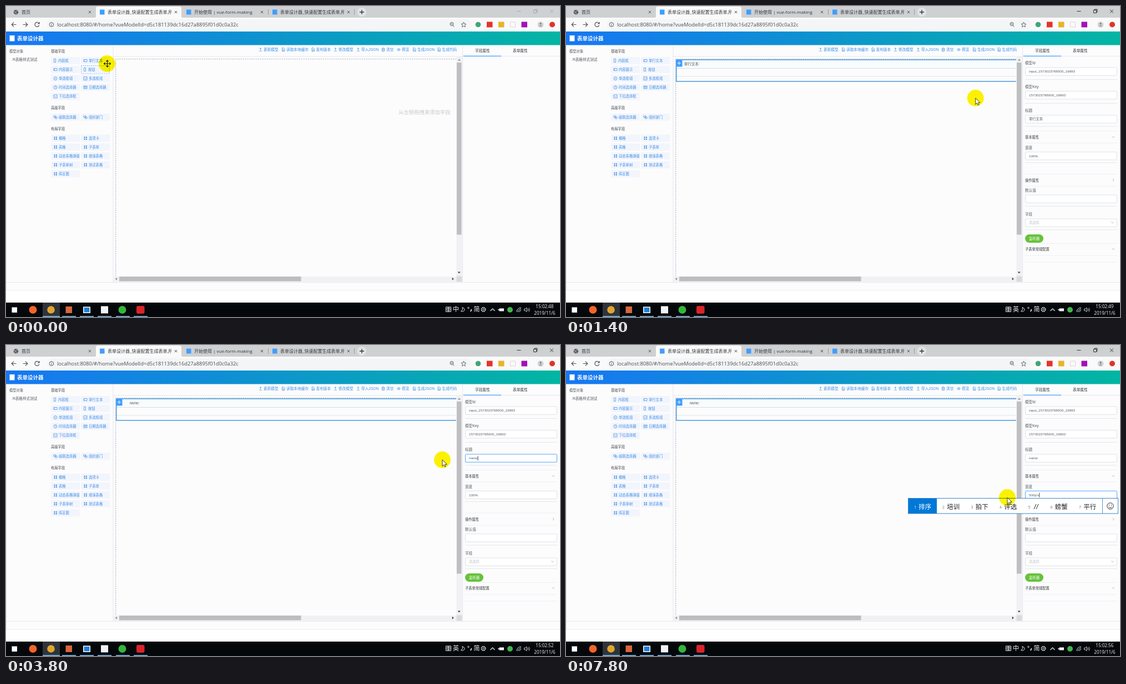
An HTML page for the animation above (8000 ms loop, 998 px wide and 561 px high).

```html
<!DOCTYPE html>
<html lang="zh">
<head>
<meta charset="utf-8">
<style>
html, body { margin: 0; width: 100%; height: 100%; overflow: hidden; background: #fcfcfd; }
svg { display: block; width: 998px; height: 561px; }
text { font-family: "Liberation Sans", "Noto Sans CJK SC", "Noto Sans CJK", sans-serif; white-space: pre; }
.ui { font-family: "Open Sans", "Noto Sans CJK SC", "Noto Sans CJK", sans-serif; }
#spot { mix-blend-mode: multiply; }
</style>
</head>
<body>
<svg id="stage" viewBox="0 0 998 561"></svg>
<script>
const BLUE = '#3a8ee6', INK = '#55585e', LINE = '#e4e7ed';
const out = [];
const add = s => out.push(s);
const rect = (x, y, w, h, fill, more = '') =>
  add(`<rect x="${x}" y="${y}" width="${w}" height="${h}" fill="${fill}" ${more}/>`);
const circle = (x, y, r, fill, more = '') =>
  add(`<circle cx="${x}" cy="${y}" r="${r}" fill="${fill}" ${more}/>`);
const path = (d, stroke, w = 1, more = '') =>
  add(`<path d="${d}" fill="none" stroke="${stroke}" stroke-width="${w}" ${more}/>`);
const text = (x, y, s, size, fill, more = '') =>
  add(`<text x="${x}" y="${y}" font-size="${size}" fill="${fill}" ${more}>${s}</text>`);
const hline = (x1, x2, y, color = LINE, w = 1) => path(`M${x1} ${y}H${x2}`, color, w);
const group = (id, draw, more = '') => { add(`<g id="${id}" ${more}>`); draw(); add('</g>'); };
const UI = 'class="ui"';

// Small outline icons, about 6 px wide, centred on x, y
const shapes = {
  tall: 'M-1.5-3h3v6h-3z',
  wide: 'M-3-2h6v4h-6zM-1.5-.8v1.6',
  radio: 'M-3 0a3 3 0 1 0 6 0a3 3 0 1 0-6 0M-.8 0h1.6M0-.8v1.6',
  check: 'M-3-3h6v6h-6zM-1.5 0l1.2 1.3L2-1.5',
  clock: 'M-3 0a3 3 0 1 0 6 0a3 3 0 1 0-6 0M0-2v2l1.3.8',
  date: 'M-3-2.5h6v5h-6zM-3-1h6M-1.5 .8h3',
  select: 'M-3-3h6v6h-6zM-1.5-.7L0 .8L1.5-.7',
  link: 'M-3-2.5h3.5v3h-3.5zM-.5-.5h3.5v3h-3.5z',
  grid: 'M-2.5-1.6h2M.9-1.6h2M-2.5 1.7h2M.9 1.7h2',
  up: 'M-2.5 2.5h5M0 1v-4M-1.8-1.3L0-3l1.8 1.7',
  doc: 'M-2-3h3l1.5 1.5V3h-4.5zM-1 0h2.2M-1 1.5h2.2',
  trash: 'M-3-2h6M-1-3h2M-2-2v5h4v-5M-.6-.5v2M.6-.5v2',
  eye: 'M-3.2 0Q0-4 3.2 0Q0 4-3.2 0zM-.8 0a.8.8 0 1 0 1.6 0a.8.8 0 1 0-1.6 0'
};
const icon = (name, x, y, color = BLUE) =>
  path(shapes[name], color, name === 'grid' ? 2.3 : .75, `transform="translate(${x} ${y})"`);
const cross = (x, y, r, c) => path(`M${x - r} ${y - r}l${2 * r} ${2 * r}M${x + r} ${y - r}l${-2 * r} ${2 * r}`, c, .9);
const chevron = (x, y, right) =>
  path(right ? `M${x - 1} ${y - 2.2}l2.2 2.2l-2.2 2.2` : `M${x - 2.2} ${y - 1}l2.2 2.2l2.2-2.2`, '#909399', .7);

function browser() {
  rect(0, 0, 998, 22, '#cfd0d2');
  rect(0, 21, 998, 25, '#fafafa');
  path('M159 22Q162 22 162 18V4Q162 1 166 1H312Q316 1 316 4V18Q316 22 319 22Z', 'none', 0, 'style="fill:#fafafa"');
  [[183, 173], [339, 329], [494, 484]].forEach(([x, ix], i) => {
    rect(ix - 4, 6.5, 8.5, 9, '#409eff');
    text(x, 14, i === 1 ? '开始使用 | vue-form-making' : '表单设计器_快速配置生成表单,所', 8, '#33363a',
      `${UI} clip-path="url(#tab${i})"`);
  });
  circle(18, 11, 4.3, '#55585c');
  path('M14.5 10l3 1l1 3M18 7.5l2 2l1.5-.5', '#d5d6d8', 1);
  text(28, 14, '首页', 8, '#33363a', UI);
  [151, 306, 461, 617].forEach(x => cross(x, 11, 2.2, '#44474a'));
  path('M472.5 6v10M627.5 6v10', '#8c8f93', .8);
  circle(641, 11, 8, '#e2e3e5');
  path('M637 11h8M641 7v8', '#333', 1.3);
  group('controls', () => {
    path('M920.5 9.5h7M950.5 7.5h5v5h-5zM952 7.5v-1.5h5v5h-1.5', 'currentColor', .9);
    cross(983, 9.5, 3, 'currentColor');
  });
  rect(74, 24, 765, 19, '#f4f5f6', 'rx="9.5"');
  path('M18.5 33.5h-8M14 29.7l-3.8 3.8l3.8 3.8M30.500 33.500h8M35 29.700l3.800 3.800l-3.800 3.800', '#4c4f53', 1.2);
  path('M59.500 31.500a4 4 0 1 0 .3 3.200M60 29v3h-3', '#4c4f53', 1.2);
  circle(82, 33.500, 3.800, 'none', 'stroke="#55585c"');
  path('M82 33v2.600M82 31.200v.9', '#55585c', 1);
  text(92, 37, 'localhost:8080/#/home?vueModelId=d5c181139dc16d27a8895f01d0c0a32c', 9.3, '#4a4d51', UI);
  circle(803, 32.500, 3, 'none', 'stroke="#55585c"');
  path('M805 35l2.500 2.500M801.500 32.500h3', '#55585c', 1);
  path('M824.500 29l1.300 3.200l3.200.2l-2.500 2.200l.9 3.300l-2.900-1.800l-2.900 1.800l.9-3.300l-2.500-2.200l3.200-.2z', '#55585c', .9);
  circle(850.500, 33.500, 4.800, '#41a57c');
  rect(866, 28.500, 10.500, 10, '#e3352d');
  rect(887, 28.500, 10.500, 10, '#e5b52c');
  rect(908.500, 29, 9, 9, 'none', 'stroke="#c4c6c8" stroke-dasharray="2 1"');
  rect(928.500, 28.500, 10.500, 10, '#a112b5');
  circle(963, 33.500, 5.500, '#d3d5d8');
  circle(963, 32, 1.700, '#7c8086');
  path('M960 36.500q3-3 6 0z', 'none', 0, 'style="fill:#7c8086"');
  circle(984, 33.500, 5, '#dd352b');
  rect(0, 46, 998, 24.500, 'url(#head)');
  rect(6.500, 53, 9, 10.500, '#fff');
  text(20, 62, '表单设计器', 9.500, '#fff', 'font-weight="700"');
}

const fields = [
  ['tall', '内容框', 0, 98.5, 'wide', '单行文本'], ['wide', '内容展示', 0, 114.5, 'tall', '按钮'],
  ['radio', '单选框组', 0, 130.700, 'check', '多选框组'], ['clock', '时间选择器', 0, 146.700, 'date', '日期选择器'],
  ['select', '下拉选择框', 0, 163], ['link', '级联选择器', 0, 200.500, 'link', '组织部门'],
  ['grid', '栅格', 0, 238.500, 'grid', '选项卡'], ['grid', '表格', 0, 254.500, 'grid', '子表单'],
  ['grid', '动态表格弹窗', 0, 270.500, 'grid', '增强表格'], ['grid', '子表单树', 0, 286.500, 'grid', '测试表格'],
  ['grid', '库区图', 0, 302.700]
];

function sidebar() {
  text(6, 84.300, '模型对象', 6.300, INK);
  text(12, 98.800, 'R表格样式测试', 6.600, INK);
  [['基础字段', 84.300], ['高级字段', 186.300], ['布局字段', 223.800]].forEach(([s, y]) => text(81, y, s, 6.300, '#3f4247'));
  const button = (x, y, kind, label) => {
    const narrow = kind === 'tall' ? 1 : 0;
    rect(x, y - 6.500, 52, 13, '#f3f5fc');
    icon(kind, x + 8 - narrow, y);
    text(x + 14 - narrow, y + 2.300, label, 6.300, BLUE);
  };
  fields.forEach(([k1, s1, , y, k2, s2]) => {
    button(81, y, k1, s1);
    if (k2) button(135, y, k2, s2);
  });
  rect(135.500, 107.500, 51, 14.500, 'none', 'id="pressed" stroke="#6aa9e8" stroke-width=".8" stroke-dasharray="2 1.500"');
}

function canvasArea() {
  path('M.5 71V513M193 71V498M822.500 71V498', LINE, 1);
  hline(0, 998, 498.500); hline(0, 998, 513);
  rect(0, 513.500, 998, 22, '#fff');
  hline(193, 822, 91);
  [['up', '更新模型', 464], ['doc', '读取本地缓存', 505], ['doc', '发布版本', 558.500], ['up', '修改模型', 599], ['up', '导入JSON', 640],
   ['trash', '清空', 685], ['eye', '预览', 713], ['doc', '生成JSON', 741], ['doc', '生成代码', 785.500]].forEach(([k, s, x]) => {
    icon(k, x - 5.500, 78.700);
    text(x, 81.200, s, 6.700, BLUE);
  });
  path('M811 95.700H197.700V487', '#8f98a8', .8, 'stroke-dasharray="2.200 1.700"');
  group('hint', () => text(707, 194.500, '从左侧拖拽来添加字段', 9.400, '#c6c8cc'));
  group('field', () => {
    rect(198.500, 97, 613, 15.500, '#f8fcfd');
    group('hover', () => { rect(198.500, 97, 613, 15.500, '#eaf4fb'); rect(198.500, 127, 613, 8.500, '#ecf4fc'); });
    hline(199, 811, 112.500, '#d8dde5'); hline(199, 811, 127, '#dfe4ea');
    path('M811 97H198.700V136H811', '#4a9ae0', 1.500);
    rect(198, 97, 11.500, 12.500, '#409eff');
    path('M200.500 103.200h6.500M203.700 100v6.500', '#fff', .9);
    text(240.500, 106.800, '', 6.500, INK, 'id="label" text-anchor="end"');
  });
  rect(811.500, 92, 10, 396, '#f1f1f3');
  rect(812, 102, 8.500, 310.500, '#bfbfc1');
  rect(194, 488, 617.500, 9.500, '#f1f1f3');
  rect(204, 488, 327.500, 8.500, '#bdbdbf');
  rect(811.500, 487.500, 10, 10, '#dadadd');
  const tip = (d, c) => path(d, 'none', 0, `style="fill:${c}"`);
  tip('M814 98.500h5l-2.500-3z', '#8a8c90'); tip('M813.700 479.500h5l-2.500 3z', '#3c3e42');
  tip('M199.800 489.800v5l-3-2.500z', '#8a8c90'); tip('M803.800 489.800v5l3-2.500z', '#3c3e42');
}

function panel() {
  hline(823, 998, 90.500);
  text(845, 82.700, '字段属性', 6.700, '#33363b');
  text(913, 82.700, '表单属性', 6.700, '#33363b');
  hline(824, 892, 90.300, '#409eff', 1.300);
  group('form', () => {
    [[105, '模型Id', 118], [148.300, '模型Key', 160.700], [191, '标题', 204], [257.700, '宽度', 270.300], [335, '默认值', 347.800], [378.300, '字段', 391]]
      .forEach(([y, s, mid]) => {
        text(827, y, s, 6.600, INK);
        rect(827.500, mid - 7, 165, 14.300, '#fff', `rx="1.500" stroke="#dcdfe6" stroke-width=".9" id="box${Math.floor(mid)}"`);
      });
    text(834, 120.300, 'input_1573023768000_16693', 6.250, INK);
    text(834, 163, '1573023768000_16693', 6.250, INK);
    text(834, 393.300, '请选择', 6.250, '#c0c4cc');
    [132.500, 175.500, 217, 282.500, 361, 403.500].forEach(y => hline(827, 993, y));
    [225.500, 247, 303, 325, 428.500, 450, 462].forEach(y => hline(827, 993, y, '#edf0f5'));
    [[238.800, '基本属性'], [316.500, '操作属性', 1], [440.800, '子表单常规配置']].forEach(([y, s, right]) => {
      text(827, y, s, 6.250, '#33363b');
      chevron(986, y - 2.500, right);
    });
    chevron(984.500, 390.500);
    rect(827, 412, 33, 15, '#67c23a', 'rx="7.500"');
    text(843.500, 422, '监听器', 6.300, '#fff', 'text-anchor="middle"');
    [['title', 206.300], ['width', 272.500]].forEach(([id, y]) => {
      rect(834, y - 6, 0, 8, '#2a7fd8', `id="${id}Sel"`);
      text(834, y, '', 6.250, INK, `id="${id}"`);
      path(`M0 ${y - 6}v8`, '#222', .8, `id="${id}Caret"`);
    });
  });
}

function taskbar() {
  rect(0, 535, 998, 26, '#05080b');
  rect(66, 535, 31, 26, '#30343a');
  rect(10.500, 543.500, 9.500, 9.500, '#fff');
  circle(48.500, 548, 7, '#f0652a');
  circle(81, 548, 6.800, '#dfa62f');
  rect(107.500, 542, 11.500, 12, '#d8663c');
  rect(139, 542.500, 13, 11.500, '#fff');
  rect(140.500, 544, 10, 8.500, '#1f7fd6');
  rect(171, 541.500, 13, 13, '#f2f2f2');
  circle(209.500, 548, 7, '#35b53c');
  rect(235, 541, 14.500, 14, '#d9252a', 'rx="3"');
  [66, 101, 133, 165, 198, 230].forEach((x, i) => rect(x, 559.300, i ? 25 : 31, 1.700, '#7cb8ea'));
  const W = '#f2f2f2';
  path('M792.500 543h9v8.500h-9zM797 543v8.500M792.500 547h9M794 549.500h6M794 545h6', W, .9);
  text(805, 551.200, '', 11, W, 'id="mode"');
  path('M822 543.500q4.500 2 4 5q-2 4-6.500 2q4-1 2.500-7z', W, .9);
  circle(833, 544.500, 1.300, 'none', `stroke="${W}" stroke-width=".8"`);
  path('M838 547q1 2-1.500 4', W, 1.500);
  text(842.500, 551.200, '简', 11, W);
  circle(860, 547.500, 3.700, 'none', `stroke="${W}" stroke-width="1.600" stroke-dasharray="2 .9"`);
  circle(860, 547.500, 1.500, 'none', `stroke="${W}" stroke-width=".8"`);
  path('M872.500 550l4-4l4 4', W, 1.100);
  rect(888.500, 545.500, 8.500, 5, W); rect(886.500, 547, 2, 2, W);
  circle(908, 548, 5, '#43b649');
  path('M920 552a8 8 0 0 1 8-8M922.500 552a5.500 5.500 0 0 1 5.500-5.500M925 552a3 3 0 0 1 3-3', W, .9);
  path('M933.500 546.500h2l2.500-2.500v8l-2.500-2.500h-2zM940 546q1.500 2 0 4M942 544.500q2.500 3.500 0 7', W, .8);
  text(970.300, 545, '', 8.100, W, `${UI} id="clock" text-anchor="middle"`);
  text(970.500, 556.700, '2019/11/6', 8.100, W, `${UI} text-anchor="middle"`);
}

function candidates() {
  rect(616.500, 276.500, 378, 27.500, '#fff', 'stroke="#3f87c9"');
  rect(617, 277, 51, 27, '#0078d7');
  [['排序', 627], ['培训', 678], ['拍下', 729.500], ['评选', 781], ['', 832.500], ['螃蟹', 872.500], ['平行', 924]].forEach(([s, x], i) => {
    text(x, 295, i + 1, 7, i ? '#777' : '#fff', UI);
    text(x + 8.300, 296, s, 11.400, i ? '#222' : '#fff');
  });
  path('M843 296l4-9M847 296l4-9', '#222', 1);
  path('M966.500 277v27', '#3f87c9', .9);
  circle(980.500, 290.500, 5.700, 'none', 'stroke="#222"');
  path('M977.500 292q3 3.500 6 0M978.500 288.200v1.500M982.500 288.200v1.500', '#222', 1);
}

function pointer() {
  group('spot', () => circle(0, 0, 15, '#fff400'));
  group('tools', () => {
    circle(0, 0, 3.800, 'none', 'id="ring" stroke="#f01818" stroke-width="1.600"');
    path('M0 0v11.500l2.700-2.500l1.700 3.900l1.900-.8l-1.700-3.800h3.700z', '#111', .8, 'id="arrow" style="fill:#fff"');
    path('M.5-4.500q1.500 0 2 1q.5-1 2-1M2.500-3.500v8M.5 5.500q1.500 0 2-1q.5 1 2 1', '#1c2440', 1, 'id="beam"');
    path('M-5.500 0h12M.5-6v12M-3.500-2l-2 2l2 2M4.500-2l2 2l-2 2M-1.500-4l2-2l2 2M-1.500 4l2 2l2-2', '#222', 1.200, 'id="move"');
  });
}

add(`<defs><linearGradient id="head"><stop stop-color="#1677f3"/><stop offset="1" stop-color="#03b5a3"/></linearGradient>` +
  [183, 339, 494].map((x, i) => `<clipPath id="tab${i}"><rect x="${x}" y="0" width="115" height="22"/></clipPath>`).join('') + '</defs>');
rect(0, 0, 998, 561, '#fcfcfd');
[browser, sidebar, canvasArea, panel, taskbar].forEach(draw => draw());
group('ime', candidates);
pointer();
document.getElementById('stage').innerHTML = out.join('');

const el = id => document.getElementById(id);
const show = (id, on) => el(id).setAttribute('visibility', on ? 'inherit' : 'hidden');
const set = (id, name, v) => el(id).setAttribute(name, v);
const put = (id, s) => { if (el(id).textContent !== s) el(id).textContent = s; };
const within = (t, a, b) => t >= a && t < b;
const stepAt = (steps, t) => steps.filter(s => s[0] <= t).pop()[1];

const route = [[0, 182, 104], [800, 555, 111], [900, 564, 111], [1000, 572, 114], [1700, 862, 205], [1900, 870, 208],
  [2000, 868, 208], [2400, 786, 207], [4300, 786, 207], [4900, 844, 272], [5100, 844, 272], [5400, 795, 275], [8000, 795, 275]];
const titles = [[0, '单行文本'], [3000, 'n'], [3100, 'na'], [3300, 'nam'], [3400, 'name']];
const widths = [[0, '100%'], [5700, ''], [6500, '5'], [6600, '50'], [6800, '500'], [7400, '500p'], [7500, "500p'x"]];

function position(t) {
  const i = Math.max(1, route.findIndex(p => p[0] >= t));
  const [a, b] = [route[i - 1], route[i]];
  const k = (t - a[0]) / (b[0] - a[0]);
  return [a[1] + (b[1] - a[1]) * k, a[2] + (b[2] - a[2]) * k];
}

function input(id, value, selected, caret, x) {
  put(id, value);
  const end = 834 + (value ? el(id).getComputedTextLength() : 0);
  const from = Math.max(834, Math.min(x, end));
  set(id + 'Sel', 'x', from);
  set(id + 'Sel', 'width', selected ? end - from : 0);
  set(id, 'fill', selected && from === 834 ? '#fff' : INK);
  set(id + 'Caret', 'transform', `translate(${end + .5} 0)`);
  show(id + 'Caret', caret);
}

function render(time) {
  const t = Math.floor(time / 100) * 100;
  const [x, y] = position(t);
  const dropped = t >= 600;
  const title = stepAt(titles, t);
  show('pressed', t < 100);
  show('hint', !dropped);
  show('field', dropped);
  show('form', dropped);
  show('hover', dropped && y < 136);
  set('controls', 'color', dropped ? '#222' : '#a2a4a8');
  put('label', title + ':');
  put('mode', within(t, 600, 4800) ? '英' : '中');
  put('clock', '15:02:' + (48 + Math.floor((t + 300) / 1000)));
  input('title', title, within(t, 2000, 3000), within(t, 3000, 4200) || within(t, 4700, 5100), x);
  input('width', stepAt(widths, t), within(t, 5200, 5700),
    within(t, 5700, 6000) || within(t, 6500, 6900) || t >= 7400, x);
  set('box204', 'stroke', within(t, 2000, 5100) ? '#409eff' : '#dcdfe6');
  set('box270', 'stroke', t >= 5100 ? '#409eff' : '#dcdfe6');
  show('ime', t >= 7400);
  const beam = x > 826;
  show('move', t < 100);
  show('arrow', t >= 100 && !beam);
  show('beam', beam);
  show('ring', within(t, 100, 600) || within(t, 2000, 2400) || within(t, 5000, 5400));
  ['spot', 'tools'].forEach(id => set(id, 'transform', `translate(${x} ${y})`));
}

const start = performance.now();
function tick() {
  render((performance.now() - start) % 8000);
  requestAnimationFrame(tick);
}
tick();
</script>
</body>
</html>
```
